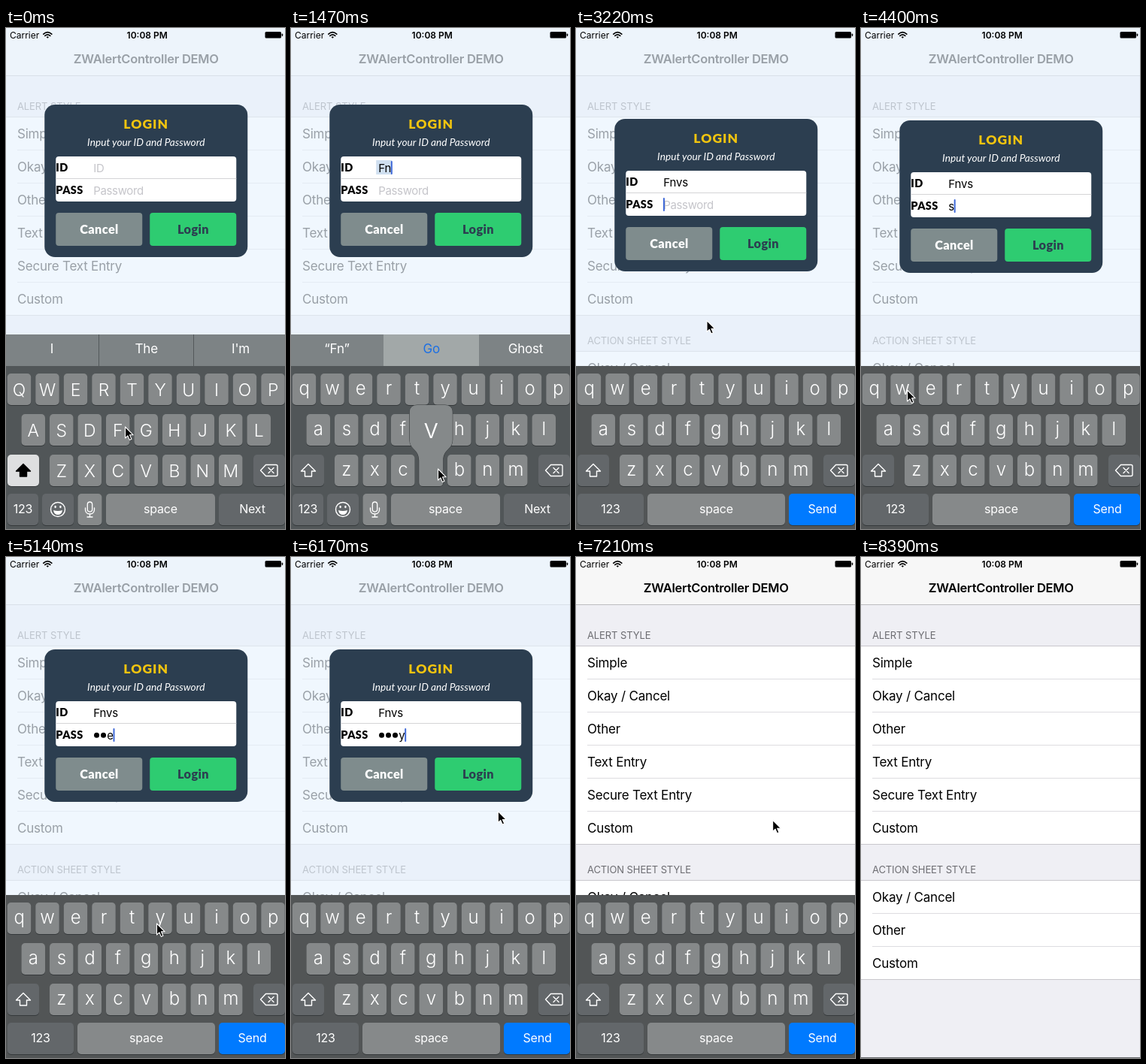
These frames come from a looping animation (371 px wide and 667 px high, 8.49 s). An HTML page:

```html
<!DOCTYPE html>
<html lang="en">
<head>
<meta charset="utf-8">
<title>Alert demo</title>
<style>
html, body { margin: 0; width: 100%; height: 100%; overflow: hidden; background: #efeff4; }
svg { display: block; width: 100vw; height: 100vh; }
text { font-family: Inter, Roboto, sans-serif; letter-spacing: -.2px; white-space: pre; }
.mid { text-anchor: middle; }
.gill { font-family: Lato, "Open Sans", sans-serif; font-weight: 900; letter-spacing: .4px; }
.head { letter-spacing: 1px; }
.msg { font-weight: 400; font-style: italic; letter-spacing: 0; }
</style>
</head>
<body>
<svg id="stage" viewBox="0 0 371 667"></svg>
<script>
const LOOP = 8490, STEP = 147, CENTER = 186.25;
const stage = document.getElementById('stage');
const pen = document.createElement('canvas').getContext('2d');

// Each table row: first step, value(s).
const ID_TEXT = [[0, ''], [3, 'F'], [7, 'Fn'], [11, 'Fnv'], [14, 'Fnvs']];
const PASS_TEXT = [[0, ''], [28, 's'], [32, 'w'], [35, 'e'], [37, 'y']];
const DOTS = [[0, 0], [32, 1], [35, 2], [37, 3]];
const PRESSED = [[0, ''], [1, 'f'], [3, ''], [5, 'n'], [7, ''], [9, 'v'], [11, ''], [13, 's'], [14, '']];
const HINTS = [
  [0, ['I', 'The', "I'm"]], [3, ['“F”', '', '']], [7, ['“Fn”', 'Go', 'Ghost']],
  [11, ['“Fnv”', '', '']], [14, ['“Fnvs”', '', '']]
];
const POINTER = [
  [0, 158.5, 531], [2, 154, 533], [5, 262, 588], [6, 264, 589], [9, 197, 588], [10, 195.5, 587],
  [13, 80, 536], [14, 82, 530], [17, 195, 231.5], [19, 188, 217], [20, 188, 217],
  [24, 160, 562], [27, 75, 537], [28, 74, 534], [30, 61.5, 482], [32, 62, 483],
  [34, 94, 486], [35, 200.5, 488], [37, 203, 486], [39, 322, 503], [40, 312, 420],
  [43, 257, 298], [46, 255.5, 296], [48, 257, 307], [56, 294, 654], [57, 300, 690]
];
const ALERT_Y = [[0, 102], [20, 102], [21, 112], [22, 121], [23, 123]];
const FADE = [[0, 1], [44, 1], [45, .8], [46, .39], [47, .1], [48, 0]];
const DROP = [[0, 0], [49, 0], [50, 55], [51, 150], [52, 205], [53, 216]];

const held = (table, i) => table.filter(r => r[0] <= i).pop()[1];
function tween(table, i, col = 1) {
  const n = table.findIndex(r => r[0] > i);
  if (n < 0) return table[table.length - 1][col];
  const a = table[n - 1], b = table[n];
  return a[col] + (b[col] - a[col]) * (i - a[0]) / (b[0] - a[0]);
}

const text = (x, y, s, size, fill = '#000', cls = '', extra = '') =>
  `<text x="${x}" y="${y}" font-size="${size}" fill="${fill}" class="${cls}" ${extra}>${s}</text>`;
const mid = (x, y, s, size, fill, cls = '', extra = '') => text(x, y, s, size, fill, 'mid ' + cls, extra);
const rect = (x, y, w, h, fill, r = 0) =>
  `<rect x="${x}" y="${y}" width="${w}" height="${h}" rx="${r}" fill="${fill}"/>`;
const path = (d, fill, stroke = 'none', w = 1) =>
  `<path d="${d}" fill="${fill}" stroke="${stroke}" stroke-width="${w}" stroke-linejoin="round" stroke-linecap="round"/>`;
const spaced = px => `style="letter-spacing:${px}px"`;

function section(title, y, rows) {
  const line = '#c8c7cc', h = rows.length * 44;
  return text(15, y - 9.4, title, 13, '#6d6d72', '', spaced(-.1)) +
    rect(0, y, 371, h + 1, '#fff') + rect(0, y, 371, 1, line) + rect(0, y + h, 371, 1, line) +
    rows.map((s, n) => text(15, y + 28.8 + n * 44, s, 17) +
      (n ? rect(15, y + n * 44, 356, 1, '#dddce0') : '')).join('');
}

const PAGE = rect(0, 0, 371, 667, '#efeff4') +
  rect(0, 0, 371, 63, '#f7f7f7') + rect(0, 63, 371, 1, '#bcbcbf') +
  mid(CENTER, 47, 'ZWAlertController DEMO', 16.5, '#000', '', 'font-weight="600" ' + spaced(-.25)) +
  section('ALERT STYLE', 118, ['Simple', 'Okay / Cancel', 'Other', 'Text Entry', 'Secure Text Entry', 'Custom']) +
  section('ACTION SHEET STYLE', 430, ['Okay / Cancel', 'Other', 'Custom']) +
  rect(0, 666, 371, 1, '#66696b');

const STATUS = text(5, 13.6, 'Carrier', 12, '#000', '', spaced(0)) +
  mid(187.7, 13.6, '10:08 PM', 12, '#000', '', 'font-weight="600" ' + spaced(0)) +
  path('M49.8 8.2Q55.3 3 60.8 8.2M51.8 10.4Q55.3 7.2 58.8 10.4', 'none', '#000', 1.6) +
  path('M53.6 12L55.3 13.8 57 12Q55.3 10.6 53.6 12Z', '#000') +
  rect(344.5, 5, 21.5, 8.5, '#000', 1.5) + rect(366.7, 7.5, 1.5, 3.5, '#000', .7);

function alertBox(i) {
  const id = held(ID_TEXT, i), pass = held(PASS_TEXT, i), dots = held(DOTS, i);
  const inPass = i >= 20, x0 = 65;
  pen.font = '15px Inter, Roboto, sans-serif';
  const end = (s, n) => x0 + n * 9 + pen.measureText(s).width - .2 * s.length;
  const entry = (s, y, hint, n = 0) => s
    ? text(x0 + n * 9, y, s, 15) : text(x0, y, hint, 15, '#c5c5ca', '', spaced(-.35));
  let out = rect(0, 0, 270, 203, '#2c3e50', 14) +
    mid(135, 31.8, 'LOGIN', 17.5, '#f1c40f', 'gill head') +
    mid(135, 55, 'Input your ID and Password', 13.7, '#fff', 'gill msg') +
    rect(15, 69, 240, 60, '#fff', 4) + rect(15, 98, 240, 1, '#d4d4d6') +
    text(15, 89.3, 'ID', 14.5, '#000', 'gill') + text(15, 119.3, 'PASS', 14.5, '#000', 'gill');
  if (i >= 7 && i < 11) out += rect(62, 74, end(id, 0) - 61, 19, '#cfdff0');
  out += entry(id, 89.5, 'ID') + entry(pass, 119.5, 'Password', dots);
  for (let n = 0; n < dots; n++) out += `<circle cx="${x0 + 4.3 + n * 9}" cy="114.3" r="3.5"/>`;
  if (i > 0) out += rect((inPass ? end(pass, dots) : end(id, 0)) - .3, inPass ? 105 : 75, 2, 18, '#3f69d8', 1);
  return out + rect(15, 144, 115, 44, '#7f8c8d', 4) + rect(140, 144, 115, 44, '#2ecc71', 4) +
    mid(72.7, 171.5, 'Cancel', 16.3, '#fff', 'gill') + mid(197.7, 171.5, 'Login', 16.3, '#2c3e50', 'gill');
}

const KEY = '#86898a', DARK = '#63676a';
const cap = (x, y, w, fill) => rect(x, y + 1, w, 42, '#35393b', 5) + rect(x, y, w, 42, fill, 5);
const LETTERS = [];
['qwertyuiop', 'asdfghjkl', 'zxcvbnm'].forEach((row, r) => {
  [...row].forEach((c, n) => LETTERS.push({ c, x: [17.5, 36.25, 73.75][r] + n * 37.5, y: 460 + r * 54 }));
});

function popup(c, upper) {
  const k = LETTERS.find(l => l.c === c);
  const d = `M${k.x - 28.5} ${k.y - 56}q0-10 10-10h37q10 0 10 10v36c0 14-12.5 12-12.5 28v29q0 5-5 5h-22q-5 0-5-5v-29c0-16-12.5-14-12.5-28z`;
  return path(d, '#34383a', '#34383a', 1) + path(d, '#85898a') +
    mid(k.x, k.y - 22, upper ? c.toUpperCase() : c, upper ? 33 : 36, '#fff', '', 'font-weight="300"');
}

function bottomRow(secure) {
  const label = (x, s) => mid(x, 646.3, s, 16, '#fff');
  if (secure) return cap(2, 620, 88, DARK) + cap(95, 620, 183, KEY) + cap(283, 620, 88, '#007aff') +
    label(46, '123') + label(186.5, 'space') + label(327.5, 'Send');
  return cap(2, 620, 41, DARK) + cap(48, 620, 42, DARK) + cap(95.5, 620, 32, KEY) +
    cap(133, 620, 145, KEY) + cap(283, 620, 88, DARK) +
    label(22.5, '123') + label(205.5, 'space') + label(327.5, 'Next') +
    '<circle cx="69" cy="641" r="9.5" fill="none" stroke="#fff" stroke-width="1.4"/>' +
    '<ellipse cx="65.6" cy="637.5" rx="1.2" ry="1.8" fill="#fff"/><ellipse cx="72.4" cy="637.5" rx="1.2" ry="1.8" fill="#fff"/>' +
    path('M63 642Q69 644 75 642Q74 648 69 648T63 642Z', '#fff') +
    '<rect x="108.3" y="631" width="6.4" height="13" rx="3.2" fill="none" stroke="#fff" stroke-width="1.3"/>' +
    path('M105.5 639V641.5Q106 647 111.5 647T117.5 641.5V639M111.5 647V651M108 651H115', 'none', '#fff', 1.3);
}

function hintBar(i) {
  const words = held(HINTS, i), picked = words[1] === 'Go';
  return rect(0, 408, 371, 42, '#7d8385') +
    rect(123, 408, 1, 42, '#54595b') + rect(249, 408, 1, 42, '#54595b') +
    (picked ? rect(123, 408, 127, 42, '#a2a8a8') : '') +
    words.map((s, n) => mid([61, 186.7, 312][n], 433.3, s, 17, picked && n === 1 ? '#1b6fe4' : '#fff')).join('');
}

function keyboard(i) {
  const upper = i < 3, secure = i >= 20, hit = held(PRESSED, i);
  return (secure ? '' : hintBar(i)) + rect(0, 450, 371, 217, secure ? '#525556' : '#515658') +
    LETTERS.map(k => cap(k.x - 15.75, k.y, 31.5, KEY) +
      mid(k.x, k.y + (upper ? 29.5 : 28), upper ? k.c.toUpperCase() : k.c, upper ? 23 : 24, '#fff',
        '', 'font-weight="300"')).join('') +
    cap(2, 568, 42, upper ? '#dedfe0' : DARK) + cap(329, 568, 42, DARK) +
    path('M23 580.5L32.5 590H27.5V597H18.5V590H13.5Z', upper ? '#000' : 'none', upper ? '#000' : '#fff', 1.4) +
    path('M338.5 589L345.5 581.5H359Q361 581.5 361 583.5V594.5Q361 596.5 359 596.5H345.5Z', 'none', '#fff', 1.4) +
    path('M349 585.5L356 592.5M356 585.5L349 592.5', 'none', '#fff', 1.4) +
    bottomRow(secure) + (hit ? popup(hit, upper) : '');
}

const ARROW = path('M0 0V15L3.4 11.8 5.8 17.4 8.4 16.3 6 10.8H10.7Z', '#000', '#fff', 1.1);

function draw(i) {
  const o = tween(FADE, i), drop = tween(DROP, i), y = tween(ALERT_Y, i), s = .9 + .1 * o;
  let out = PAGE + `<rect width="371" height="667" fill="#e9f3fe" opacity="${.66 * o}"/>` + STATUS;
  if (o > 0) out += `<g opacity="${o}" transform="translate(${CENTER} ${y + 101.5}) scale(${s}) translate(-135 -101.5)">${alertBox(i)}</g>`;
  if (drop < 216) out += `<g transform="translate(0 ${drop})">${keyboard(i)}</g>`;
  out += `<g transform="translate(${tween(POINTER, i)} ${tween(POINTER, i, 2)})">${ARROW}</g>`;
  stage.innerHTML = out;
}

const start = performance.now();
let shown = -1;
function tick() {
  const t = (performance.now() - start) % LOOP;
  const i = Math.min(57, Math.floor((t + 20) / STEP));
  if (i !== shown) draw(shown = i);
  requestAnimationFrame(tick);
}
tick();
</script>
</body>
</html>
```
